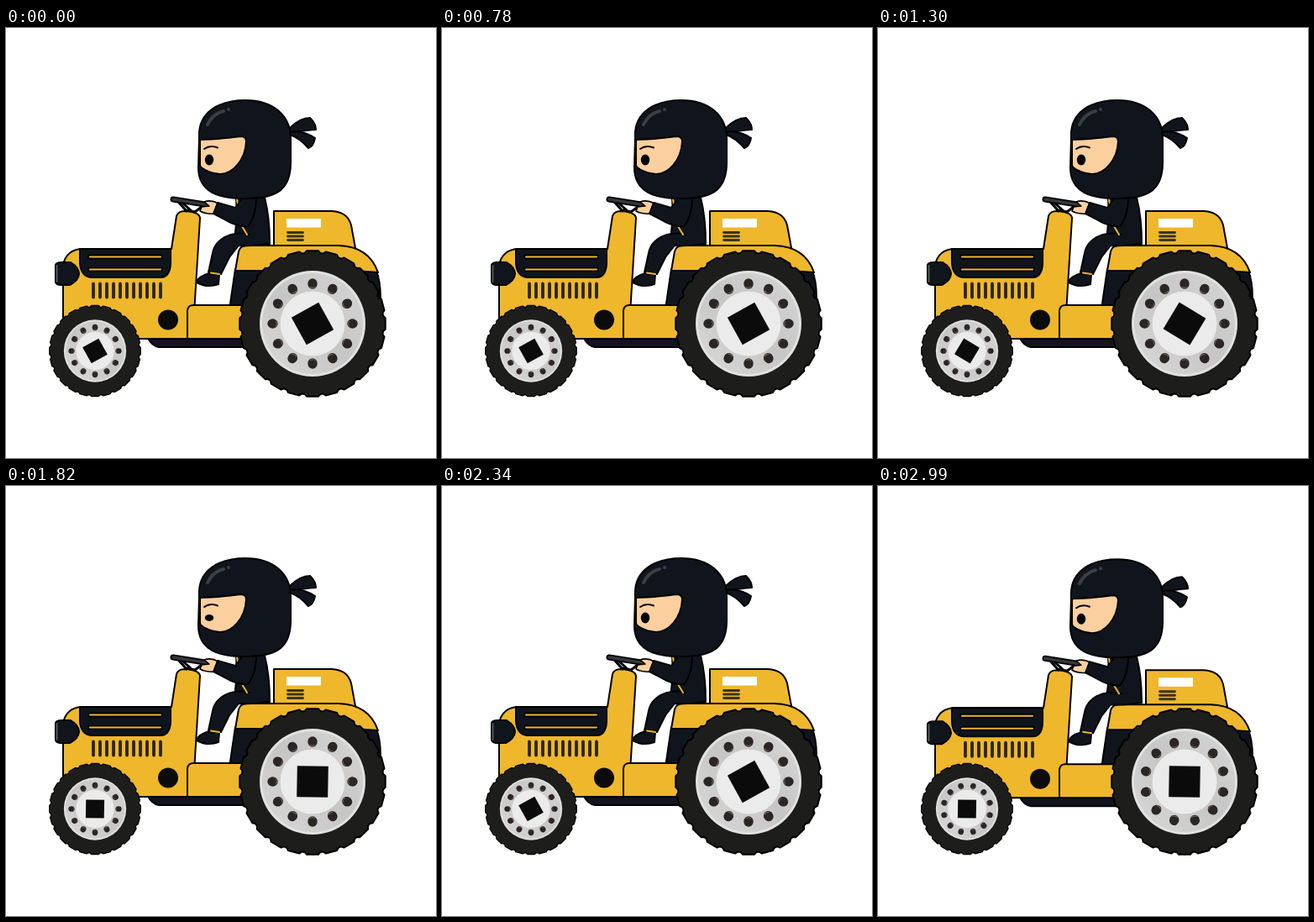
Animation, 512 px wide and 512 px high, one loop 3120 ms. Source, as an HTML page:

```html
<!DOCTYPE html>
<html lang="en">
<head>
<meta charset="utf-8">
<title>Ninja on a tractor</title>
<style>
  html, body { margin: 0; width: 100%; height: 100%; overflow: hidden; background: #fff; }
  svg { display: block; width: 100vw; height: 100vh; }
  .yellow { fill: #efb72c; }
  .dark { fill: #10151d; }
  .skin { fill: #fccf9f; }
  .line { fill: none; }
</style>
</head>
<body>
<svg viewBox="0 0 512 512" stroke-linejoin="round" stroke-linecap="round">
  <defs>
    <linearGradient id="steel" x1="0" y1="1" x2="1" y2="0">
      <stop offset="0" stop-color="#dadada"/>
      <stop offset=".5" stop-color="#c6c6c6"/>
      <stop offset="1" stop-color="#d6d6d6"/>
    </linearGradient>
  </defs>

  <g id="body" stroke="#000" stroke-width="2">
    <!-- chassis, seat and rear fender -->
    <path class="dark" d="M168 368Q174 379 182 380H290V368Z"/>
    <path class="dark" d="M273 287H440Q446 300 446 322L436 335H266Z"/>
    <path class="yellow" d="M319 262V218H388Q407 219 411 235L416 262Z"/>
    <path fill="#fff" stroke="none" d="M334 227h41v10.500h-41z"/>
    <path class="line" stroke="#3a3320" stroke-width="2.800" d="M335.500 243.500h18M335.500 248h18M335.500 252.500h18"/>
    <path class="yellow" d="M273 289L277 266Q279 259 287 259H396Q432 260 443 291Q420 289 400 289Z"/>

    <!-- hood and step -->
    <path class="yellow" d="M68 345V282Q72 264 90 263H197L203 224Q205 218 213 218Q230 219 231 226L224.500 332L217 337V370H150Z"/>
    <path class="dark" d="M88 263H196V281Q195 297 184 297H102Q89 296 88 280Z"/>
    <path class="line" stroke-width="6" d="M100 272.500H184M100 287.500H184"/>
    <path class="line" stroke="#efb72c" d="M100 272.500H184M100 287.500H184"/>
    <path id="vents" class="line" stroke="#292520" stroke-width="3.800"/>
    <path class="dark" d="M59 282Q60 279 66 279H77Q87 285 87 293Q86 301 76 306H64Q59 305 59 302Z"/>
    <path class="line" stroke="#555" d="M60.500 283V302"/>
    <path class="yellow" d="M216 370V336Q217 330 223 330H290V370Z"/>
    <circle cx="193" cy="347.500" r="12" fill="#0b0b0b" stroke="none"/>

    <!-- driver -->
    <path class="dark" d="M274 202H308Q314 225 314 257L270 259Q276 236 274 202Z"/>
    <path class="dark" d="M314 256Q300 260 277 259L266 273L256 293L241 291L246 268Q249 252 268 246Q280 243 290 246"/>
    <path class="dark" d="M254 293L253 305Q240 310 227 303Q228 296 242 292Z"/>
    <path class="line" stroke="#efb72c" d="M244 291.500L254 293M275 204L276.500 213M281 236L287 246"/>
    <path class="line" stroke-width="3" d="M206 208L215 218M211 209L220 217M233 213L225 219L216 217"/>
    <path class="line" stroke-width="7" d="M199 204L240 210.500"/>
    <path class="line" stroke="#34363a" stroke-width="3.500" d="M199 204L240 210.500"/>
    <path class="skin" stroke-width="1.500" d="M253 209L249 221Q238 222 231 218L233 213L242 212L236 207Q244 204 253 209Z"/>
    <path class="dark" d="M298 203Q297 226 288 236Q280 237 268 232L247 221L252 208L273 214L282 202"/>
    <path class="dark" d="M338 119Q350 107 362 107Q369 114 369 121Q355 122 338 125Z"/>
    <path class="dark" d="M338 124Q352 121 368 131Q366 141 360 143Q350 131 338 127Z"/>
    <path class="dark" d="M230 131C228 100 254 86 285 86C318 86 339 104 339 132V160C339 190 325 202 290 203C252 204 229 195 229 166Z"/>
    <path class="skin" d="M231 133Q260 132 279 129Q286 129 286 135C285 158 269 174 255 174C240 173 231 166 231 163Z"/>
    <path class="line" d="M236 144Q243 139 252 142.500"/>
    <ellipse id="eye" cx="242" cy="157" rx="5.200" ry="6.500" stroke="none"/>
    <path class="line" stroke="#3b3f42" stroke-width="4" d="M240 115Q246 102 259 99M265 97h.1"/>
  </g>
  <g id="wheels"></g>
</svg>
<script>
const STEP = 130, STEPS = 24, TEETH = 24;
const $ = id => document.getElementById(id);
const polar = (r, deg) => {
  const a = deg * Math.PI / 180;
  return [r * Math.cos(a), r * Math.sin(a)].map(v => v.toFixed(2));
};

$('vents').setAttribute('d',
  Array.from({ length: 11 }, (_, i) => `M${104 + i * 8} 304.5V320.5`).join(''));

function tread() {
  const pitch = 360 / TEETH, points = [];
  for (let i = 0; i < TEETH; i++)
    for (const [r, at] of [[84.5, -.42], [87, -.3], [87, .3], [84.5, .42]])
      points.push(polar(r, (i + at) * pitch));
  return points.join(' ');
}

// data-turn is the angle in degrees that a part gains with each step
function wheel(x, y, tyreScale, hubScale) {
  const holes = Array.from({ length: 12 }, (_, i) =>
    `<g transform="rotate(${i * 30}) translate(0 -47.5)">
      <ellipse rx="5.700" ry="6.200" fill="#2b2625"/>
      <path class="line" stroke="#79615d" stroke-width="1" d="M-3 4Q0 6 3 4"/>
    </g>`).join('');
  return `<g transform="translate(${x} ${y})">
    <g transform="scale(${tyreScale})">
      <polygon data-turn="-15" points="${tread()}" fill="#1d1d1b" stroke="#000" stroke-width="2"/>
    </g>
    <g transform="scale(${hubScale})">
      <circle r="63" fill="#e2e2e2"/>
      <circle r="60" fill="url(#steel)"/>
      <circle r="38.500" fill="#ebebeb"/>
      <g data-turn="-15">${holes}</g>
      <g data-turn="-30">
        <rect x="-18.500" y="-18.500" width="37" height="37" fill="#0b0b0b" transform="rotate(-29)"/>
      </g>
    </g>
  </g>`;
}

$('wheels').innerHTML = wheel(365, 352, 1, 1) + wheel(106, 384.5, .625, .59);
const turning = document.querySelectorAll('[data-turn]');
const lids = { 14: .6, 15: .15, 16: .6 };

function draw(now) {
  const step = Math.floor(now / STEP) % STEPS;
  $('body').setAttribute('transform', `translate(0 ${step % 2 * 1.25})`);
  $('eye').setAttribute('ry', 6.5 * (lids[step] || 1));
  for (const part of turning)
    part.setAttribute('transform', `rotate(${part.dataset.turn * step})`);
}

let start;
function tick(now) {
  start ??= now;
  draw(now - start);
  requestAnimationFrame(tick);
}
draw(0);
requestAnimationFrame(tick);
</script>
</body>
</html>
```
